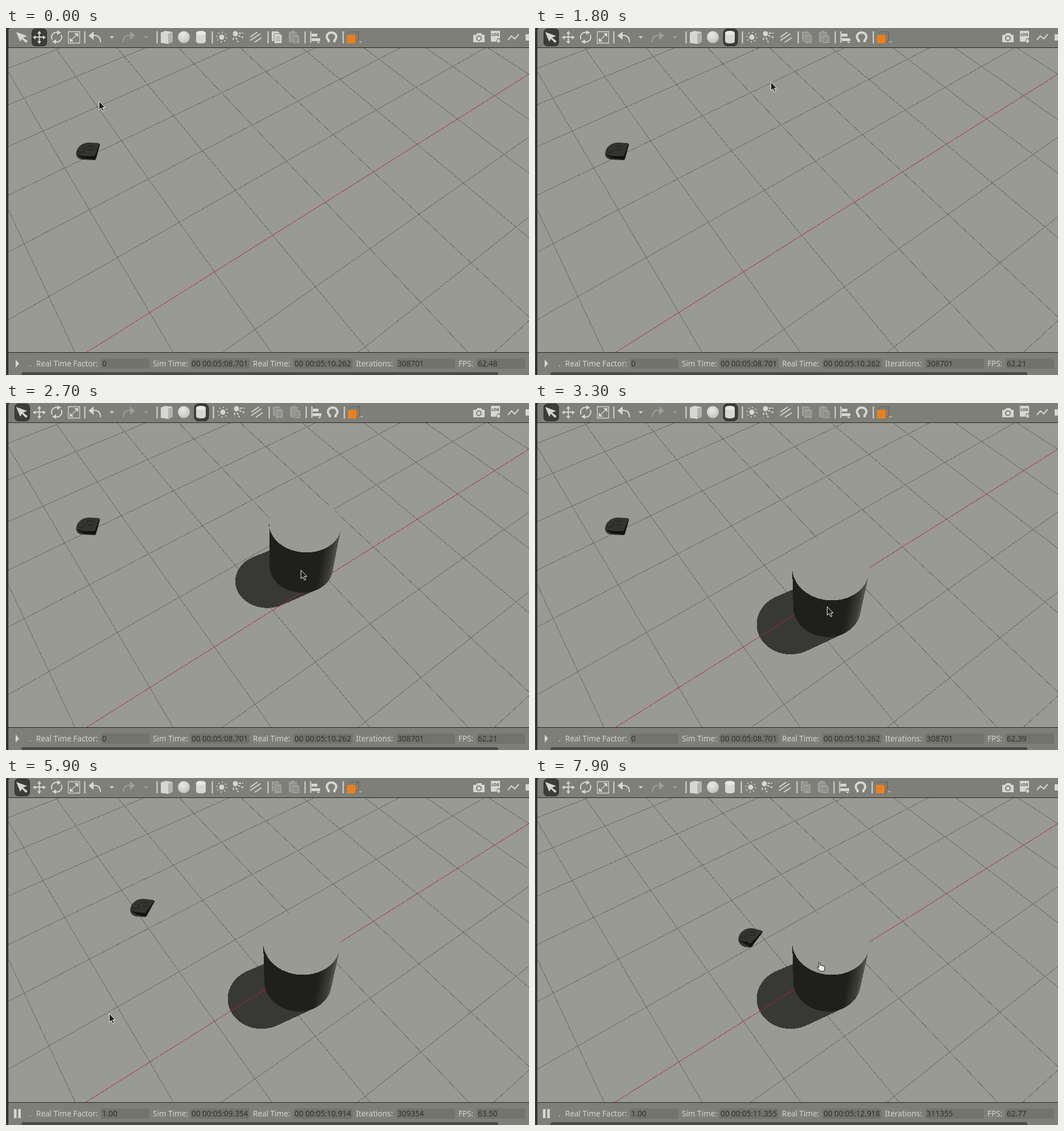
Animation, 919 px wide and 609 px high, one loop 8000 ms. Source, as an HTML page:

```html
<!DOCTYPE html>
<html lang="en">
<head>
<meta charset="utf-8">
<title>Simulator view</title>
<style>
  html, body { margin: 0; width: 100%; height: 100%; overflow: hidden; background: #3a3935; }
  svg { display: block; width: 919px; height: 609px; }
  text { font: 13.5px "Noto Sans", "Open Sans", sans-serif; fill: #d3d4cf; white-space: pre; }
  text.value { fill: #30312c; }
  .icon { fill: #d6d7d2; }
  .line { fill: none; stroke: #d6d7d2; stroke-width: 2; }
  .dim { opacity: .36; }
  .held { fill: #3c3d38; stroke: #2b2c28; }
  .field { fill: #72736d; }
  .sharp { shape-rendering: crispEdges; }
  #grid { fill: none; stroke: #34352f; stroke-opacity: .45; }
  #axis { fill: none; stroke: #a8283f; stroke-opacity: .78; }
</style>
</head>
<body>
<svg viewBox="0 0 919 609">
  <defs>
    <clipPath id="view"><rect x="4" y="35" width="915" height="534"/></clipPath>
    <linearGradient id="side" x1="0" y1="0" x2="1" y2=".245">
      <stop offset=".835" stop-color="#1f201b"/>
      <stop offset=".97" stop-color="#3e3f39"/>
      <stop offset="1" stop-color="#50514b"/>
    </linearGradient>
    <radialGradient id="ball" cx=".4" cy=".3" r=".75">
      <stop offset=".2" stop-color="#e2e3df"/><stop offset="1" stop-color="#c0c1bc"/>
    </radialGradient>
  </defs>

  <rect x="3" width="1" height="609" fill="#1c1c19"/>
  <path d="M4 609V5Q4 0 9 0H919V609Z" fill="#7e7f79"/>
  <rect x="4" y="34" width="915" height="536" fill="#23241f"/>
  <rect x="4" y="35" width="915" height="534" fill="#999a94"/>

  <g clip-path="url(#view)">
    <g id="scene">
      <g class="sharp">
        <path id="grid"/>
        <path id="shadow" fill="#373833" fill-opacity=".98"/>
        <path id="axis"/>
        <path id="body" fill="url(#side)"/>
        <path id="cap" fill="#999a94"/>
      </g>
      <g id="robot">
        <path id="shell" fill="#33342f"/>
        <path id="underside" fill="#11120e"/>
        <path d="M-18-1Q-13 3-8 0Q-4-4-7-7M-2-9L9-10M0-3L10-4" fill="none" stroke="#1b1c18"/>
      </g>
    </g>
  </g>

  <g id="tools">
    <rect id="heldSelect" class="held" x="15.500" y="1.500" width="26" height="30" rx="6"/>
    <rect id="heldMove" class="held" x="45.500" y="1.500" width="26" height="30" rx="6"/>
    <path class="icon" d="M18 7L37 14L30 17L38 23L35 26L28 19L25 24Z"/>
    <path class="line" d="M50 16H67M58.500 8V25"/>
    <path class="icon" d="M58.500 5L62 10H55ZM58.500 28L62 23H55ZM47 16.500L52 13V20ZM70 16.500L65 13V20Z"/>
    <path class="line" d="M81 20A8.500 8.500 0 0 1 91 8M97 12A8.500 8.500 0 0 1 87 24"/>
    <path class="icon" d="M90 4L97 8L90 12ZM88 20L81 24L88 28Z"/>
    <path class="line" style="stroke-width:1.300" d="M109.500 6.500H129.500V26.500H109.500ZM114 22L126 10"/>
    <path class="icon" d="M120 9H127V16ZM112 17V24H119Z"/>
    <g id="undo">
      <path class="line" d="M151 13H157Q166 14 166 25"/>
      <path class="icon" d="M145 13.500L154 6V21Z"/>
    </g>
    <path class="icon" d="M182 14.500H190L186 18.500Z"/>
    <g class="dim">
      <use href="#undo" transform="matrix(-1 0 0 1 372 0)"/>
      <path class="icon" d="M242 14.500H250L246 18.500Z"/>
    </g>
    <path class="line" d="M138.500 6V27M265.500 6V27"/>
    <path class="icon" d="M272 8L280 5L293 7V24L285 28L272 26Z"/>
    <path d="M285 10L293 7V24L285 28Z" fill="#b3b4af"/>
    <circle cx="312.500" cy="16" r="10.500" fill="url(#ball)"/>
    <rect id="heldCylinder" class="held" x="331" y="1.500" width="25" height="30" rx="7"/>
    <path class="icon" d="M334 9Q334 5 342.500 5T351 9V23Q351 27 342.500 27T334 23Z"/>
    <ellipse cx="342.500" cy="9" rx="8.500" ry="3.500" fill="#e7e8e4"/>

    <g id="tail">
      <path class="line" d="M362.500 6V27M460.500 6V27M525.500 6V27M592.500 6V27"/>
      <circle class="icon" cx="379" cy="16" r="4.500"/>
      <circle class="line" cx="379" cy="16" r="8.500" stroke-dasharray="2 4.675"/>
      <circle class="icon" cx="403" cy="10" r="4.500"/>
      <path class="line" d="M409 9H417M408 13L417 17M404 17L408 25M400 17L399 22" stroke-dasharray="4 2"/>
      <path class="line" d="M429 16L442 7M429 22L447 10M437 25L449 17"/>
      <g id="copy">
        <path class="icon" d="M467 6H478L481 9V23H467Z"/>
        <path class="icon" d="M471 10H482L485 13V27H471Z" stroke="#7e7f79"/>
        <path d="M474 16H482M474 19H482M474 22H482" stroke="#8e8f89"/>
      </g>
      <g class="dim">
        <path class="icon" d="M497 7H501V5H507V7H511V25H497Z"/>
        <path class="icon" d="M502 11H512L516 15V27H502Z" stroke="#7e7f79"/>
        <path d="M505 17H513M505 20H513M505 23H513" stroke="#6a6b65"/>
      </g>
      <path class="line" d="M535.500 6V26"/>
      <path class="icon" d="M537 10H547V15H537ZM537 18H552V23H537ZM546 24H552L549 27Z"/>
      <path class="line" style="stroke-width:4" d="M567 25V22Q562 17 564.500 12Q567 8 572 8T579.500 12Q582 17 577 22V25"/>
      <path d="M599.500 12L605 6.500H619.500L614 12M619.500 6.500V21L614 26.500" fill="none" stroke="#5f605a"/>
      <path d="M599 12H614V27H599Z" fill="#ec7f1b"/>
      <path d="M620 23H626L623 26Z" fill="#b0b1ac"/>
    </g>
    <path class="icon" d="M821 12H826L828 9H835L837 12H841V25H821Z"/>
    <circle cx="831" cy="18" r="4" fill="none" stroke="#7e7f79" stroke-width="2"/>
    <path class="icon" d="M852 5H868V18H863V24H852Z"/>
    <text x="853" y="13.500" style="font-size:6.500px;font-weight:700;fill:#50514c">LOG</text>
    <path class="icon" d="M863.500 19H867.500V22H870L865.500 27L861 22H863.500Z" stroke="#7e7f79" stroke-width=".7"/>
    <path class="line" d="M882 21L888 14L894 19L901 11"/>
    <rect class="icon" x="913" y="11" width="8" height="11"/>
  </g>

  <g id="status">
    <rect x="27" y="604" width="838" height="9" rx="4" fill="#4b4b47"/>
    <rect id="heldPlay" class="held" x="7.500" y="579.500" width="25" height="19" rx="6"/>
    <path id="play" class="icon" d="M17 582L23 589L17 596Z"/>
    <path id="pause" class="icon" d="M14 581H18.500V597H14ZM21.500 581H26V597H21.500Z"/>
    <text x="41" y="594">.</text>
  </g>

  <g id="arrow">
    <path d="M.5 .5V15.500L4 12.500L6.500 18L9 17L6.500 11.500H11Z" fill="#1d1e1b" stroke="#f2f2ef"/>
  </g>
  <g id="hand">
    <path d="M1.500 1Q3.500 0 4 2V6Q6 5 7 6.500Q9 6 10 7.500Q12 7 12 9V13L11 16H4L0 11Q-2 8 0 8L2 9.500Z" fill="#f4f4f1" stroke="#1d1e1b"/>
  </g>
</svg>

<script>
const $ = id => document.getElementById(id);
const LOOP = 8000, STEP = 100;

// Perspective: ground origin, vanishing point and homogeneous weight of each axis.
const origin = [468.6, 363.8];
const axes = [
  { at: [2434, -871], k: .0495 },
  { at: [-547, -859], k: .069 },
  { at: [468, 840], k: -.1254 }
];
const RADIUS = .495, CAST = [-.579, .093];

function project(...world) {
  let [x, y] = origin, w = 1;
  world.forEach((v, i) => {
    const { at, k } = axes[i];
    x += at[0] * k * v;
    y += at[1] * k * v;
    w += k * v;
  });
  return [x / w, y / w];
}

function toGround([px, py]) {
  const [X, Y] = axes;
  const a = X.at[0] - px, b = Y.at[0] - px, c = X.at[1] - py, d = Y.at[1] - py;
  const dx = px - origin[0], dy = py - origin[1], det = a * d - b * c;
  return [(dx * d - b * dy) / det / X.k, (a * dy - c * dx) / det / Y.k];
}

const toPath = pts => "M" + pts.map(p => p.map(v => v.toFixed(2)).join(" ")).join("L");

function circle([cx, cy], z) {
  return Array.from({ length: 72 }, (_, i) => {
    const a = i * Math.PI / 36;
    return project(cx + RADIUS * Math.cos(a), cy + RADIUS * Math.sin(a), z);
  });
}

function hull(pts) {
  const cross = (o, a, b) => (a[0] - o[0]) * (b[1] - o[1]) - (a[1] - o[1]) * (b[0] - o[0]);
  const half = list => {
    const out = [];
    for (const p of list) {
      while (out.length > 1 && cross(out.at(-2), out.at(-1), p) <= 0) out.pop();
      out.push(p);
    }
    return out.slice(0, -1);
  };
  const sorted = [...pts].sort((a, b) => a[0] - b[0] || a[1] - b[1]);
  return [...half(sorted), ...half(sorted.reverse())];
}

// Each key is [time, ...values]; values between keys are linear.
function track(keys, t) {
  const next = keys.findIndex(k => k[0] > t);
  if (next < 0) return keys.at(-1).slice(1);
  if (next === 0) return keys[0].slice(1);
  const a = keys[next - 1], b = keys[next], f = (t - a[0]) / (b[0] - a[0]);
  return a.slice(1).map((v, i) => v + (b[i + 1] - v) * f);
}

const pointer = [
  [0, 163, 128], [200, 163, 128], [300, 160, 128], [600, 160, 128], [800, 182, 95], [1000, 182, 95],
  [1300, 342, 21], [1600, 342, 23], [1900, 450, 130], [2000, 560, 218], [2100, 560, 218],
  [2200, 529, 211], [3000, 511, 342], [3300, 513, 357], [3700, 513, 357], [4400, 68, 481],
  [4500, 68, 481], [4700, 21, 586], [4800, 21, 586], [4900, 21, 597], [5200, 22, 594],
  [5900, 181, 413], [6800, 217, 402], [7700, 490, 328], [7900, 497, 323]
];
const cylinder = [
  [2000, 507, 206], [2100, 507, 206], [2200, 611, 228], [2300, 529, 211],
  [3000, 511, 342], [3300, 513, 357.5]
];
// Center, then the rear corners relative to it.
const robot = [
  [5200, 144, 217, 21, -15, 13, 15], [5900, 239, 229, 22, -14, 7, 16],
  [7700, 370, 276, 22, -12, 3, 18], [7900, 378, 280.5, 22, -12, 2, 18]
];
const fps = [
  [0, "62.48"], [800, "62.49"], [1800, "62.21"], [2800, "62.39"],
  [3800, "62.46"], [5500, "63.50"], [6900, "63.12"], [7800, "62.77"]
];

const values = [
  ["Real Time Factor:", 53, 167, 85], ["Sim Time:", 258, 324, 104], ["Real Time:", 434, 505, 104],
  ["Iterations:", 615, 686, 103], ["FPS:", 795, 827, 85]
].map(([label, x, fieldX, width]) => {
  const add = (tag, attrs, text = "") => {
    const el = document.createElementNS("http://www.w3.org/2000/svg", tag);
    for (const name in attrs) el.setAttribute(name, attrs[name]);
    el.textContent = text;
    return $("status").appendChild(el);
  };
  add("text", { x, y: 594 }, label);
  add("rect", { x: fieldX, y: 580, width, height: 18, rx: 3, class: "field" });
  return add("text", { x: fieldX + 2, y: 594, class: "value" });
});

const draw = (id, d) => $(id).setAttribute("d", d);
const show = (id, on) => $(id).style.display = on ? "" : "none";
const place = (id, x, y) => $(id).setAttribute("transform", `translate(${x} ${y})`);
const clock = ms => "00 00:05:" + (ms / 1000).toFixed(3).padStart(6, "0");

function drawGrid() {
  let d = "";
  for (let x = -3; x <= 10; x++) d += toPath([project(x, -6), project(x, 9)]);
  for (let y = -5; y <= 8; y++) if (y) d += toPath([project(-4, y), project(14, y)]);
  draw("grid", d);
  draw("axis", toPath([project(-4, 0), project(14, 0)]));
}

function drawCylinder(t) {
  const center = toGround(track(cylinder, t));
  const base = circle(center, 0), top = circle(center, 1);
  const cast = circle(center.map((v, i) => v + CAST[i]), 0);
  const shapes = { shadow: hull([...base, ...cast]), body: hull([...base, ...top]), cap: top };
  for (const id in shapes) draw(id, t < 2000 ? "" : toPath(shapes[id]) + "Z");
}

function drawRobot(t) {
  const [x, y, tx, ty, bx, by] = track(robot, t);
  place("robot", x, y);
  draw("shell", `M-21 4Q-20-6-13-11Q-7-16 3-16L${tx - 2} ${ty}L${tx} ${ty + 2}` +
    `L${bx} ${by}L-10 ${by - 1}Q-20 13-21 4Z`);
  draw("underside", `M-18 4Q-13 8-6 8L${bx - 1} ${by - 7}L${tx - 1} ${ty + 2}L${tx} ${ty + 3}` +
    `L${bx + 1} ${by - 2}L${bx - 2} ${by - 1}L-8 12L-16 8Z`);
}

function render(t) {
  const inserting = t >= 1400 && t < 3500, selecting = t >= 1400, running = t >= 5200;
  const sim = Math.round(Math.max(0, t - 5247) * 1.0004);
  const real = Math.round(Math.max(0, t - 5249) * 1.002);

  place("scene", 0, t >= 3500 ? -1 : 0);
  drawCylinder(t);
  drawRobot(t);

  show("heldMove", !selecting);
  show("heldSelect", selecting);
  show("heldCylinder", t >= 1300 && t < 3500);
  place("tail", inserting ? 2 : 0, 0);
  $("copy").setAttribute("class", selecting ? "dim" : "");

  show("heldPlay", t >= 4700 && t < 5400);
  show("play", !running);
  show("pause", running);
  [
    sim ? "1.00" : "0", clock(8701 + sim), clock(10262 + real),
    308701 + sim, fps.findLast(k => k[0] <= t)[1]
  ].forEach((v, i) => values[i].textContent = v);

  const hovering = t >= 7700;
  show("arrow", !hovering);
  show("hand", hovering);
  place(hovering ? "hand" : "arrow", ...track(pointer, t));
}

drawGrid();
const start = performance.now();
function tick() {
  const t = (performance.now() - start) % LOOP;
  render(Math.floor(t / STEP) * STEP);
  requestAnimationFrame(tick);
}
tick();
</script>
</body>
</html>
```
